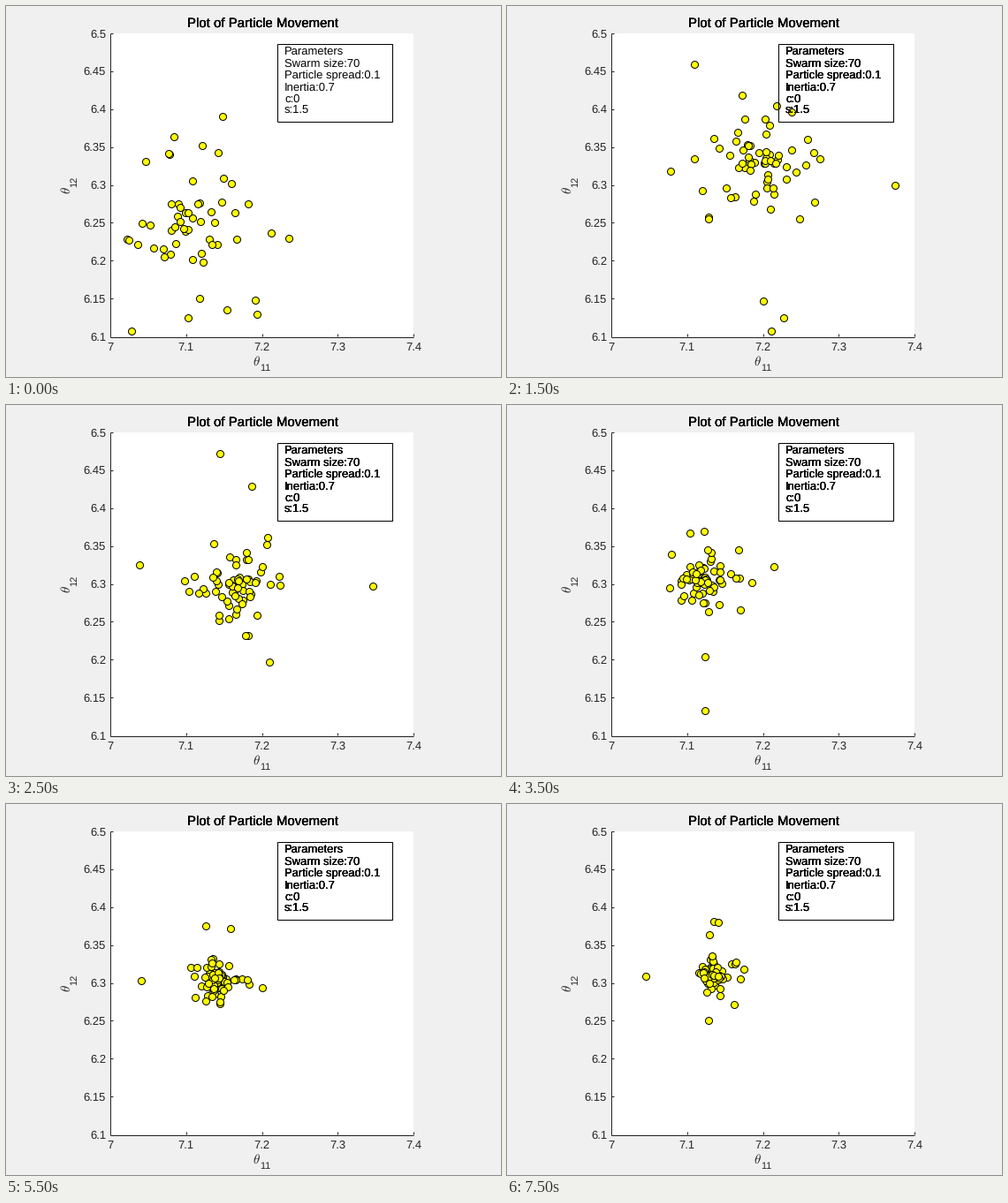
A matplotlib script that plays this animation: 560 by 420 pixels, repeating every 8 s.

```python
import numpy as np
import matplotlib.pyplot as plt
from matplotlib.animation import FuncAnimation
from matplotlib.patches import Rectangle

W, H, DPI = 560, 420, 100
PX = 72 / DPI
STEPS, STEP_MS = 16, 500
LEFT, TOP, SIZE = 118, 31, 343
BOTTOM, RIGHT = TOP + SIZE, LEFT + SIZE
INK = "#262626"

plt.rcParams["font.family"] = "Liberation Sans"
plt.rcParams["mathtext.fontset"] = "cm"
plt.rcParams["text.hinting"] = "none"
plt.rcParams["text.kerning_factor"] = 6

# The swarm overshoots to the upper right, then swings back and settles
KNOTS = (0, 3, 5, 7, 11, 15)
CENTRE_X = (200, 290, 257, 224, 241, 233)
CENTRE_Y = (245, 172, 205, 198, 199, 194)

COUNT = 70
rng = np.random.default_rng(12)
# Few particles reach far, mostly along one axis only
reach = rng.rayleigh(1, (COUNT, 2)) * rng.lognormal(0, 0.7, (COUNT, 2))
rate = rng.uniform(0.8, 2.4, (COUNT, 2))
phase = rng.uniform(0, 2 * np.pi, (COUNT, 2))


def swarm(k):
    """Visible particles at step k: swings about a moving, shrinking centre."""
    centre = np.interp(k, KNOTS, CENTRE_X), np.interp(k, KNOTS, CENTRE_Y)
    spread = np.array([8, 6]) + np.array([42, 40]) * np.exp(-k / 4)
    pts = centre + spread * reach * np.cos(rate * k + phase)
    inside = np.all((pts >= (LEFT, TOP)) & (pts <= (RIGHT, BOTTOM)), axis=1)
    return pts[inside]


fig = plt.figure(figsize=(W / DPI, H / DPI), dpi=DPI, facecolor="#f0f0f0")
ax = fig.add_axes([0, 0, 1, 1])
ax.set(xlim=(0, W), ylim=(H, 0))
ax.axis("off")


def label(x, y, s, size=13, ha="left", color=INK, **kw):
    return ax.text(x, y, s, fontsize=size * PX, ha=ha, va="baseline",
                   color=color, rotation_mode="anchor", **kw)


def rule(xs, ys):
    ax.plot(xs, ys, color=INK, lw=PX, zorder=2, solid_capstyle="butt")


ax.add_patch(Rectangle((LEFT, TOP), SIZE, SIZE, fc="white", ec="none", zorder=1))
rule((LEFT, RIGHT), (BOTTOM + 1, BOTTOM + 1))
rule((LEFT, LEFT), (TOP, BOTTOM + 1))
for i in range(5):
    x = LEFT + SIZE * i / 4
    rule((x, x), (BOTTOM, BOTTOM - 3))
    label(x, 389.5, f"{7 + i / 10:g}", ha="center")
for i in range(9):
    y = BOTTOM - SIZE * i / 8
    if i:
        rule((LEFT, LEFT + 3), (y, y))
    label(113, y + 4.5, f"{6.1 + i / 20:g}", ha="right")

label(279, 407, r"$\theta$", 15)
label(287, 413, "11", 11)
label(73, 213, r"$\theta$", 15, rotation=90)
label(80, 205, "12", 11, rotation=90)

# Overprinted text gains weight
for _ in range(4):
    label(290.5, 25, "Plot of Particle Movement", 15, ha="center", color="black")

ax.add_patch(Rectangle((307, 43), 130, 88, fc="none", ec="black", lw=PX, zorder=5))
LINES = ["Parameters", "Swarm size:70", "Particle spread:0.1",
         "Inertia:0.7", "c:0", "s:1.5"]
layers = [
    [label(315, 56 + 13.2 * i, s, color="black", zorder=6) for i, s in enumerate(LINES)]
    for _ in range(4)
]

dots, = ax.plot([], [], "o", ms=8 * PX, mfc="#ffff00", mec="black", mew=PX, zorder=4)


def draw(k):
    dots.set_data(*swarm(k).T)
    for n, layer in enumerate(layers):
        for text in layer:
            text.set_visible(n <= k)
    return [dots]


anim = FuncAnimation(fig, draw, frames=STEPS, interval=STEP_MS, repeat=True,
                     repeat_delay=0, blit=False)
plt.show()
```
